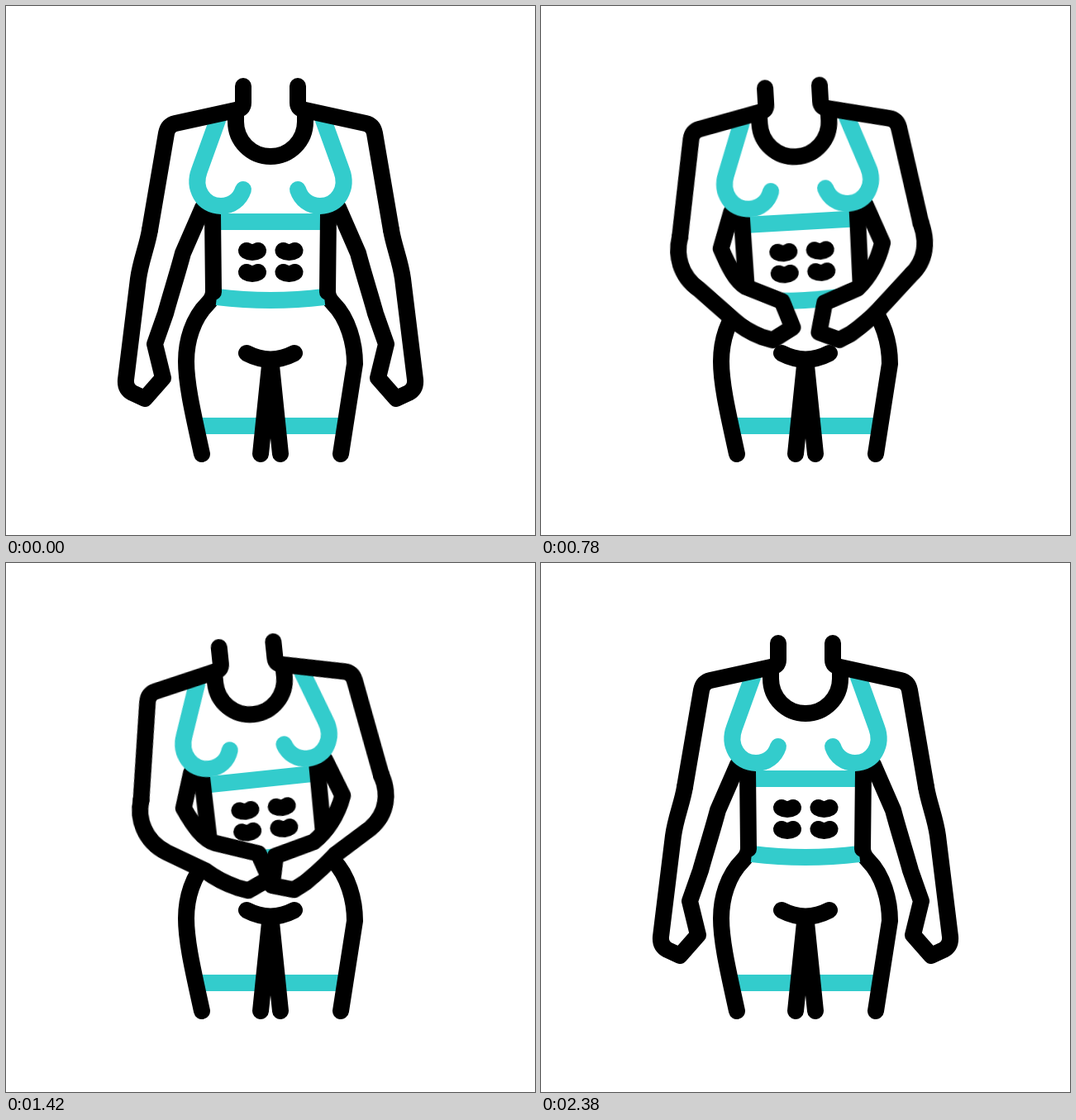
Recreate the animation shown at these times as an HTML page without scripts. Size 640 by 640 pixels, loop 2400 ms.

```html
<!DOCTYPE html>
<html lang="en">
<head>
<meta charset="utf-8">
<title>Stomach ache</title>
<style>
  html, body { margin: 0; width: 100%; height: 100%; overflow: hidden; background: #fff; }
  svg { display: block; width: 100%; height: 100%; }
  path { fill: none; stroke: #000; stroke-width: 20; stroke-linecap: round; stroke-linejoin: round; }
  .teal { stroke: #3cc; }
  .flat { stroke-linecap: butt; }

  .upper { transform-origin: 320px 379px; animation: sway 2.4s cubic-bezier(.37, 0, .63, 1) infinite; }
  .arm { fill: #fff; animation: reach-left 2.4s infinite; }
  .right .arm { animation-name: reach-right; }
  .pain { stroke-dasharray: 1 3; animation: pain 2.4s infinite; }

  @keyframes sway {
    0%, 26.7% { transform: rotate(0deg); }
    37.8% { transform: rotate(-6deg); }
    48.8% { transform: rotate(6deg); }
    59.2% { transform: rotate(-6deg); }
    70.8%, 100% { transform: rotate(0deg); }
  }

  /* arms hanging, hands passing the hips, hands on the belly, and back */
  @keyframes reach-left {
    0%, 2.1%, 97.9%, 100% {
      d: path("M174 271 C171 290 163 308 160 330 L145 452 Q144 463 153 468 L168 475 L190 450 L180 409 L193 372 C199 350 208 322 214 299 L238 244");
      animation-timing-function: cubic-bezier(.516, 0, .809, .417);
    }
    20.3% {
      d: path("M174 271 C170 292 166 305 165 326 L175 440 Q176 449 184 451 L200 455 L214 430 L196 389 L202 358 C206 340 211 318 215 298 L238 244");
      animation-timing-function: cubic-bezier(.353, .375, .273, 1);
    }
    43.3%, 56.7% {
      d: path("M174 271 C167 292 172 320 198 337 L243 364 Q258 378 279 388 L292 393 L319 381 L309 350 L258 332 C244 326 234 309 224 286 L238 244");
      animation-timing-function: cubic-bezier(.727, 0, .647, .625);
    }
    79.7% {
      d: path("M174 271 C170 292 166 305 165 326 L175 440 Q176 449 184 451 L200 455 L214 430 L196 389 L202 358 C206 340 211 318 215 298 L238 244");
      animation-timing-function: cubic-bezier(.191, .583, .484, 1);
    }
  }
  @keyframes reach-right {
    0%, 2.1%, 97.9%, 100% {
      d: path("M174 271 C171 290 163 308 160 330 L145 452 Q144 463 153 468 L168 475 L190 450 L180 409 L193 372 C199 350 208 322 214 299 L238 244");
      animation-timing-function: cubic-bezier(.516, 0, .809, .417);
    }
    20.3% {
      d: path("M174 271 C170 292 166 305 165 326 L175 440 Q176 449 184 451 L200 455 L212 431 L198 392 L203 360 C206 340 211 318 215 298 L238 244");
      animation-timing-function: cubic-bezier(.353, .375, .273, 1);
    }
    43.3%, 56.7% {
      d: path("M174 271 C167 292 170 318 194 334 L240 361 Q256 375 280 391 L294 398 L320 390 L312 355 L264 343 C248 333 232 315 223 291 L240 245");
      animation-timing-function: cubic-bezier(.727, 0, .647, .625);
    }
    79.7% {
      d: path("M174 271 C170 292 166 305 165 326 L175 440 Q176 449 184 451 L200 455 L212 431 L198 392 L203 360 C206 340 211 318 215 298 L238 244");
      animation-timing-function: cubic-bezier(.191, .583, .484, 1);
    }
  }

  /* each dash grows outward, then leaves the same way */
  @keyframes pain {
    0%, 39.9% { stroke-dashoffset: 1; opacity: 0; }
    40% { stroke-dashoffset: 1; opacity: 1; animation-timing-function: ease-out; }
    46%, 48% { stroke-dashoffset: 0; opacity: 1; animation-timing-function: ease-in; }
    54.5% { stroke-dashoffset: -1; opacity: 1; }
    54.6%, 100% { stroke-dashoffset: -1; opacity: 0; }
  }
</style>
</head>
<body>
<svg viewBox="0 0 640 640">
  <defs>
    <path id="muscle" d="M291 296 Q298 300 305 296"/>
    <path id="cup" class="teal" d="M256 138 L234 199 C226 220 238 242 260 242 C273 242 283 234 287 222"/>
    <path id="shoulder" d="M287 97 V117 Q287 125 278 126 L205 142 Q196 144 194 154 L174 271"/>
  </defs>

  <g class="legs">
    <path class="teal flat" d="M234 508 H308 M332 508 H406"/>
    <path d="M251 345 Q251 353 244 360 C226 378 218 405 218 430 C218 460 228 500 237 542"/>
    <path d="M389 345 Q389 353 396 360 C414 378 422 408 422 433 L405 542"/>
    <path d="M308 542 L319 435 M332 542 L321 435 M291 420 Q320 435 349 420"/>
  </g>

  <path class="teal pain" pathLength="1" d="M159 330 L117 317.5"/>
  <path class="teal pain" pathLength="1" d="M160 376 L126 400"/>
  <path class="teal pain" pathLength="1" d="M197 405 L185.5 447.5"/>

  <g class="upper">
    <path class="teal flat" d="M254 261 H386 M255 352 Q320 360 385 352"/>
    <path d="M250 252 L251 346 M390 252 L389 346"/>
    <use href="#muscle"/>
    <use href="#muscle" x="44.5"/>
    <use href="#muscle" y="26"/>
    <use href="#muscle" x="44.5" y="26"/>

    <path class="arm"/>
    <g class="right" transform="translate(640) scale(-1 1)"><path class="arm"/></g>

    <use href="#cup"/>
    <use href="#cup" transform="translate(640) scale(-1 1)"/>
    <path d="M278 130 V140 A42 42 0 0 0 362 140 V130"/>
    <use href="#shoulder"/>
    <use href="#shoulder" transform="translate(640) scale(-1 1)"/>
  </g>
</svg>
</body>
</html>
```
